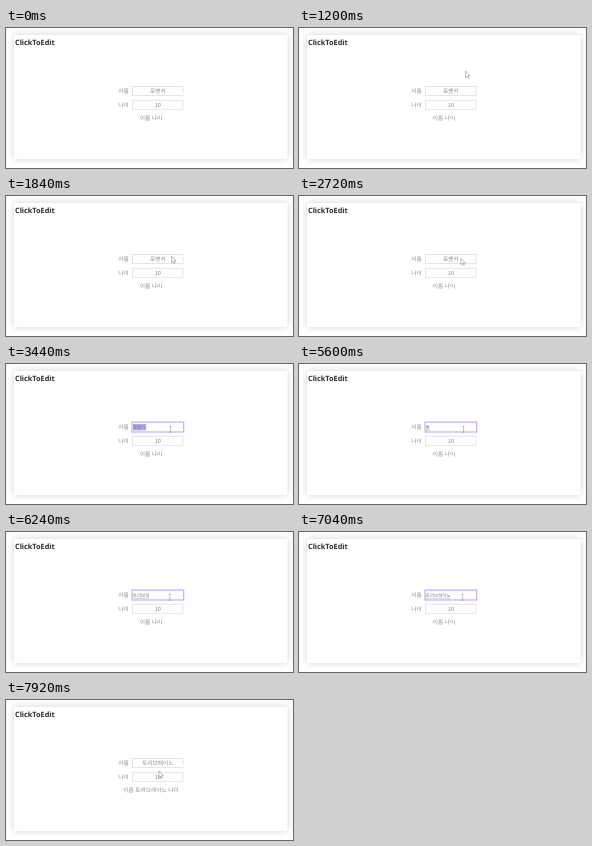
An HTML page for the animation above (8000 ms loop, 287 by 140 pixels).

```html
<!DOCTYPE html>
<html lang="ko">
<head>
<meta charset="utf-8">
<title>ClickToEdit</title>
<style>
  html, body { margin: 0; width: 100%; height: 100%; overflow: hidden; background: #fff; }
  svg { display: block; width: 100vw; height: 100vh; }
  .card { fill: #fff; filter: drop-shadow(0 0 3.5px rgba(0, 0, 0, .17)); }
  .field { fill: #fff; stroke: #e3e3e3; stroke-width: .9; }
  text { font: 5.7px "Noto Sans CJK KR", "Noto Sans CJK", sans-serif; fill: #8c8c8c; text-rendering: geometricPrecision; }
  .mid { text-anchor: middle; }
  .title { font: bold 7.3px "Noto Sans", sans-serif; fill: #2a2a2a; }
  #typed { font-size: 4.5px; fill: #777; }
</style>
</head>
<body>
<svg viewBox="0 0 287 140">
  <rect class="card" x="8" y="7" width="273.5" height="124" rx="1"/>
  <text class="title" x="9" y="17">ClickToEdit</text>
  <text x="112.3" y="65.2">이름</text>
  <text x="112.3" y="79">나이</text>
  <rect class="field" x="126.5" y="58.5" width="50.5" height="9"/>
  <rect class="field" x="126.5" y="72.3" width="50.5" height="9"/>
  <text class="mid" x="151.8" y="64.8" id="name"></text>
  <text class="mid" x="151.8" y="78.8">10</text>
  <text class="mid" x="145" y="91.5" id="summary"></text>
  <rect id="ring" x="126" y="58.1" width="51.7" height="9.9" fill="#fff" stroke="#b9aaf0" stroke-width="1.1"/>
  <rect id="selection" x="127" y="60" width="13.2" height="6.4" fill="#b9a6f0"/>
  <text id="typed" x="126.8" y="64.8"></text>
  <path id="underline" stroke="#b0b0b6" stroke-width=".6"/>
  <path id="arrow" d="M0 0V6.4L1.5 5.1L2.5 7.3L3.5 6.8L2.5 4.7H4.5Z" fill="#fff" stroke="#8e8e8e" stroke-width=".6"/>
  <path id="beam" d="M-1.1 -3H1.1M0 -3V3M-1.1 3H1.1" fill="none" stroke="#999" stroke-width=".6"/>
</svg>
<script>
const LOOP = 8000, STEP = 80;
const EDIT = 2880, FOCUS = 3120, CLEAR = 4800, BLUR = 7520;
const oldName = '로벤카', newName = '토리브레이노';

// Hangul composition, one entry per key press
const keys = [
  [5280, 'ㅌ'], [5440, '토'], [5600, '톨'], [5680, '토리'], [5760, '토립'], [5840, '토리브'],
  [6000, '토리블'], [6160, '토리브레'], [6320, '토리브렝'], [6480, '토리브레이'],
  [6720, '토리브레인'], [6880, newName]
];

// time, x, y
const path = [
  [240, 228, 69], [560, 204, 58], [1040, 168, 44], [1200, 166.5, 43], [1520, 179, 55],
  [1920, 164, 61], [2080, 164, 61], [2400, 161.8, 62], [3120, 162, 62.5], [3440, 164.5, 62.5],
  [5600, 164.5, 62.5], [6560, 163.5, 62.5], [7200, 163.5, 62.5], [7440, 230, 74],
  [7600, 230, 74], [7920, 153, 71]
];

const $ = id => document.getElementById(id);
const show = (id, on) => $(id).style.display = on ? '' : 'none';

function pointerAt(t) {
  const i = path.findIndex(p => p[0] > t);
  if (i < 0) return path[path.length - 1].slice(1);
  const a = path[Math.max(0, i - 1)], b = path[i];
  const u = Math.min(1, Math.max(0, (t - a[0]) / (b[0] - a[0] || 1)));
  const ease = u * u * (3 - 2 * u);
  return [1, 2].map(k => a[k] + (b[k] - a[k]) * ease);
}

function draw(t) {
  const editing = t >= EDIT && t < BLUR;
  const saved = t >= BLUR;
  const key = keys.filter(k => k[0] <= t).pop();
  const typed = t < CLEAR ? oldName : key ? key[1] : '';

  $('name').textContent = editing ? '' : saved ? newName : oldName;
  $('typed').textContent = editing ? typed : '';
  $('summary').textContent = saved ? `이름 ${newName} 나이` : '이름 나이';
  show('ring', editing && t >= FOCUS);
  show('selection', editing && t >= FOCUS && t < CLEAR);
  show('underline', editing && key);
  $('underline').setAttribute('d', `M126.8 66.3h${typed.length * 4.15}`);

  const [x, y] = pointerAt(t);
  const overInput = editing && x < 178 && y < 68;
  show('arrow', t >= path[0][0] && !overInput);
  show('beam', overInput);
  $('arrow').setAttribute('transform', `translate(${x} ${y})`);
  $('beam').setAttribute('transform', `translate(${x} ${y + 2.7})`);
}

const start = performance.now();
function frame() {
  const t = (performance.now() - start) % LOOP;
  draw(Math.floor(t / STEP) * STEP);
  requestAnimationFrame(frame);
}
frame();
</script>
</body>
</html>
```
